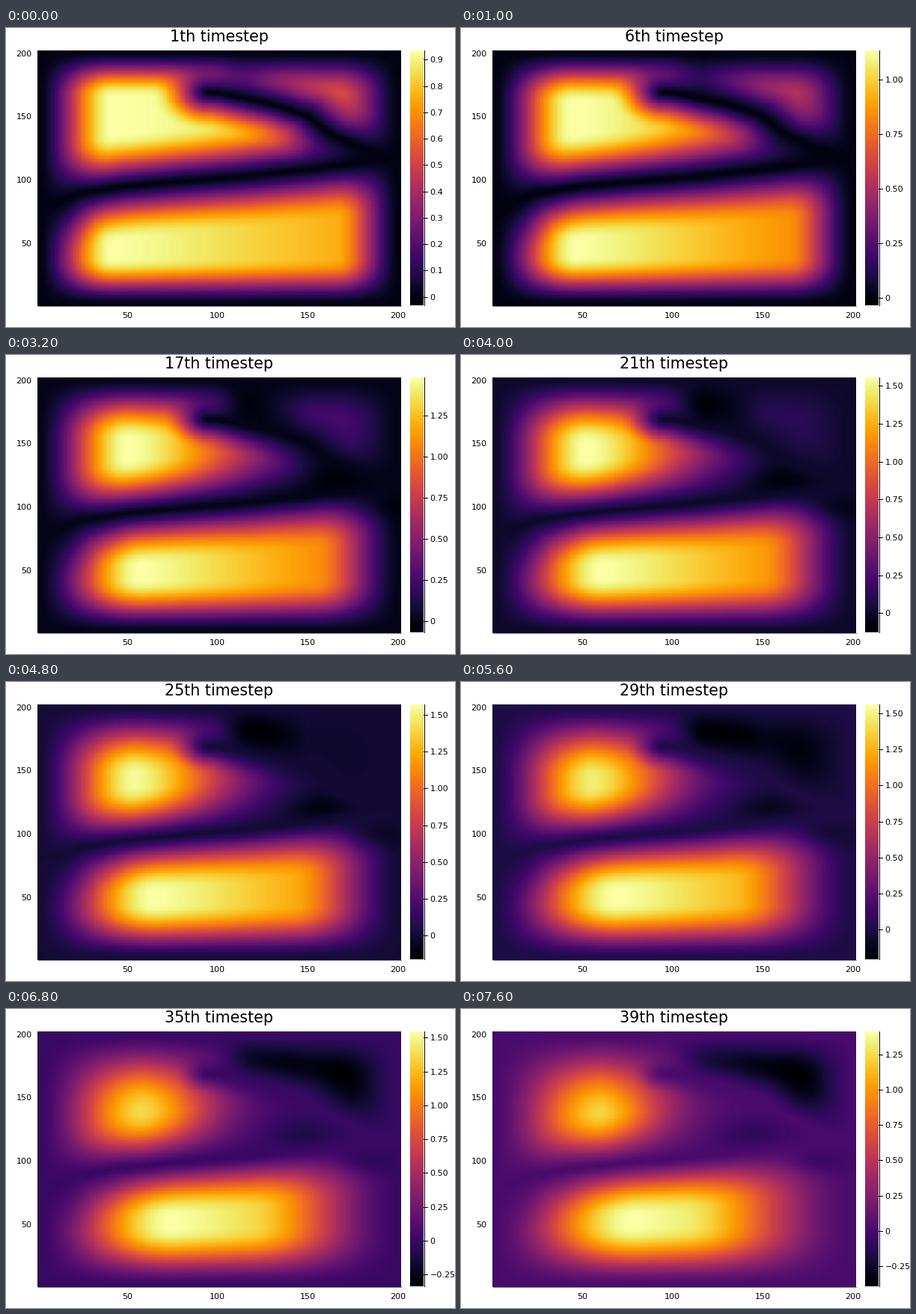
Recreate the animation shown at these times as a matplotlib script. Size 600 by 400 pixels, loop 7800 ms.

```python
import numpy as np
import matplotlib.pyplot as plt
from matplotlib.animation import FuncAnimation

plt.rcParams["font.family"] = "DejaVu Sans"

N, FRAMES, STEP_MS = 201, 39, 200
LEFT, RIGHT, TOP, BOTTOM = 42.7, 527.2, 31, 371.5
BAR_LEFT, BAR_RIGHT, BAR_BOTTOM = 540, 558, 371

# Thin walls in grid units
UPPER = [(95, 168.5), (101, 168), (115, 163.7), (132, 158.4), (148.7, 150.7),
         (163, 135.3), (178, 126.4), (192.5, 118)]
LOWER = [(0, 79), (9.5, 81), (24, 89), (49, 94.5), (78, 98.3),
         (115, 102.5), (149, 107.7), (174, 112), (192.5, 117), (201, 118)]

# Colour limits over time
KNOTS = np.array([1, 6, 14, 21, 29, 35, 39], float)
LOW = np.array([-0.032, -0.034, -0.034, -0.126, -0.207, -0.337, -0.391])
HIGH = np.array([0.932, 1.129, 1.402, 1.550, 1.557, 1.541, 1.406])

X, Y = np.meshgrid(np.arange(1, N + 1), np.arange(1, N + 1))


def hermite(t, xs, ys):
    slopes = np.gradient(ys, xs)
    i = int(np.clip(np.searchsorted(xs, t) - 1, 0, len(xs) - 2))
    h = xs[i + 1] - xs[i]
    s = (t - xs[i]) / h
    return (ys[i] * (1 + 2 * s) * (1 - s) ** 2 + ys[i + 1] * s * s * (3 - 2 * s)
            + h * slopes[i] * s * (1 - s) ** 2 - h * slopes[i + 1] * s * s * (1 - s))


def smooth(d, start, end):
    s = np.clip((d - start) / (end - start), 0, 1)
    return s * s * (3 - 2 * s)


def edge(d, width, power=1.7):
    """Rise from 0 at a border to 1 at the given distance."""
    return np.sin(np.pi / 2 * np.clip(d / width, 0, 1)) ** power


def wall(d, width):
    return edge(d, width, 1.35)


def distance(path):
    best = np.full(X.shape, np.inf)
    for (x0, y0), (x1, y1) in zip(path, path[1:]):
        dx, dy = x1 - x0, y1 - y0
        s = np.clip(((X - x0) * dx + (Y - y0) * dy) / (dx * dx + dy * dy), 0, 1)
        best = np.minimum(best, np.hypot(X - x0 - s * dx, Y - y0 - s * dy))
    return best


def bump(x, y, rx, ry):
    return np.exp(-((X - x) / rx) ** 2 - ((Y - y) / ry) ** 2)


def unit(f):
    return f / f.max()


WEST, EAST, SOUTH, NORTH = X - 1, N - X, Y - 1, N - Y
D_UP, D_LOW = distance(UPPER), distance(LOWER)
BELOW = Y < np.interp(X, *zip(*LOWER))
OVER = (X > 95) & (Y > np.interp(X, *zip(*UPPER)))
STRIP = OVER * smooth(X, 95, 120)


def lower_lobe(t):
    past = X - 41 - t
    tilt = (0.003 - 0.0016 * np.exp(-t / 8)) * (past + np.hypot(past, 20)) / 2
    f = (edge(WEST, 41 + t) * edge(EAST, 36 + 0.038 * t * t)
         * edge(SOUTH, 37 + 0.27 * t) * wall(D_LOW, 42) * (1 - tilt))
    return unit(f * BELOW)


def upper_lobe(t):
    past = np.clip(X - 41 - 0.4 * t, 0, None)
    f = (edge(WEST, 41 + 0.55 * t) * edge(EAST, 36)
         * edge(NORTH, 36 + 0.75 * t) * wall(D_LOW, 42) * wall(D_UP, 32 - 0.35 * t)
         * np.exp(-(past * (0.004 + 0.00055 * t)) ** 2))
    return unit(f * ~BELOW * (1 - STRIP))


def corner_swing(t):
    """Top right pocket: swings below zero, its left end ahead of the rest."""
    lead = 0.3 * np.clip(150 - X, 0, 45)
    level = 0.05 + 0.47 * np.cos((t + lead - 3) * np.pi / 40)
    shape = edge(NORTH, 36) * edge(EAST, 36) * wall(D_UP, 30) * STRIP
    return level * unit(shape)


def dips(t):
    drift = 0.8 * (t - 21)
    holes = bump(158 - drift, 121, 18, 11) + bump(186 - drift / 2, 98, 15, 10)
    return -0.11 * smooth(t, 10, 23) * holes * wall(D_LOW, 8) * wall(D_UP, 8)


def field(t, high):
    fade = 1 - 0.14 * smooth(t, 21, 40)
    return (high * (lower_lobe(t) + fade * upper_lobe(t))
            + corner_swing(t) + dips(t))


limits = [(hermite(n, KNOTS, LOW), hermite(n, KNOTS, HIGH))
          for n in range(1, FRAMES + 1)]
fields = [field(n, high) for n, (_, high) in enumerate(limits, 1)]

fig = plt.figure(figsize=(6, 4), dpi=100, facecolor="white")
ax = fig.add_axes([0, 0, 1, 1])
ax.axis("off")

heat = ax.imshow(fields[0], cmap="inferno", origin="lower", aspect="auto",
                 interpolation="nearest", extent=(42, 528, 372, 30))
ax.imshow(np.linspace(1, 0, 256)[:, None], cmap="inferno", aspect="auto",
          extent=(BAR_LEFT, BAR_RIGHT, BAR_BOTTOM, 30))
ax.set_xlim(0, 600)
ax.set_ylim(400, 0)

axis_line = dict(color="black", lw=0.72)
ax.plot([42.5, 42.5, 528], [30, 371.5, 371.5], alpha=0.5, **axis_line)
ax.plot([BAR_RIGHT + 0.5] * 2, [30, BAR_BOTTOM], **axis_line)

for value in (50, 100, 150, 200):
    px = LEFT + (value - 0.5) * (RIGHT - LEFT) / N
    py = BOTTOM - (value - 0.5) * (BOTTOM - TOP) / N
    ax.text(px, 388, str(value), size=8, ha="center", va="baseline")
    ax.text(34.5, py + 4, str(value), size=8, ha="right", va="baseline")

title = ax.text(285, 18, "", size=14.9, ha="center", va="baseline")
marks = [(ax.plot([], [], **axis_line)[0],
          ax.text(566.5, 0, "", size=8, va="baseline")) for _ in range(12)]


def tick_label(value, step):
    if abs(value) < 1e-9:
        return "0"
    text = f"{value:.1f}" if step == 0.1 else f"{value:.2f}"
    return text.replace("-", "\u2212")


def draw(i):
    low, high = limits[i]
    heat.set_data(fields[i])
    heat.set_clim(low, high)
    title.set_text(f"{i + 1}th timestep")

    step = 0.1 if high < 1 else 0.25
    ticks = np.arange(np.ceil(low / step), np.floor(high / step) + 1) * step
    for j, (line, text) in enumerate(marks):
        shown = j < len(ticks)
        line.set_visible(shown)
        text.set_visible(shown)
        if shown:
            y = BAR_BOTTOM - (ticks[j] - low) / (high - low) * (BAR_BOTTOM - TOP)
            line.set_data([BAR_RIGHT, BAR_RIGHT + 5], [y, y])
            text.set_y(y + 4)
            text.set_text(tick_label(ticks[j], step))
    return []


anim = FuncAnimation(fig, draw, frames=FRAMES, interval=STEP_MS,
                     repeat=True, repeat_delay=0, blit=False)
plt.show()
```
